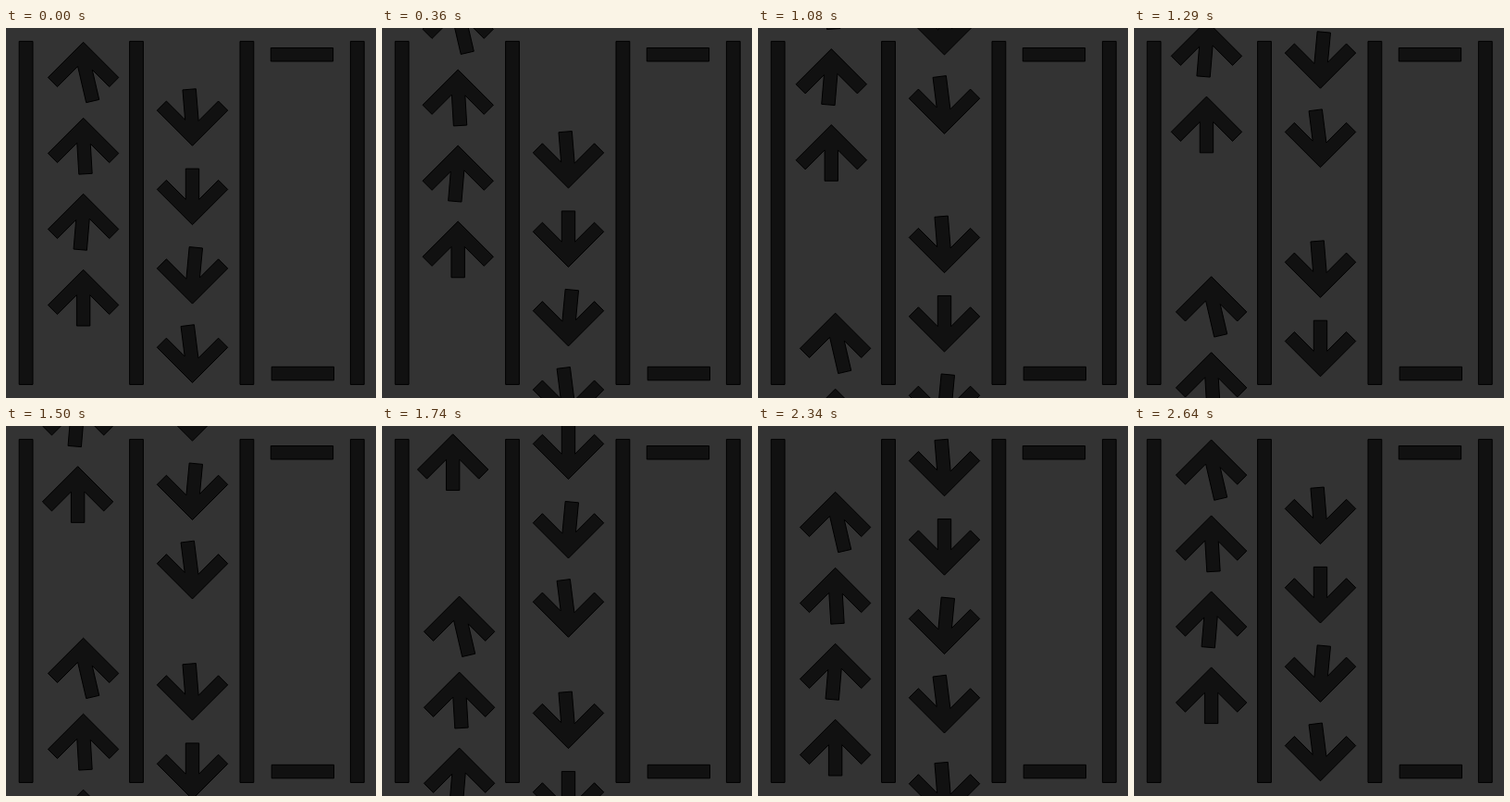
Write an HTML page with a canvas that moves like this. It is 400 by 400 pixels and loops after 2.67 s.

```html
<!DOCTYPE html>
<html lang="en">
<head>
<meta charset="utf-8">
<title>Arrow lanes</title>
<style>
  html, body { margin: 0; width: 100%; height: 100%; overflow: hidden; background: #333; }
  canvas { display: block; width: 400px; height: 400px; }
</style>
</head>
<body>
<canvas id="stage" width="400" height="400"></canvas>
<script>
const ctx = document.getElementById('stage').getContext('2d');
const LOOP = 2670, STEP = 30, END = LOOP - STEP;
const WING = 38.2, WING_END = 10.1, NOTCH = 2 * WING_END, HALF_SHAFT = 7.2;

// Shaft tilt in degrees and shaft length, top to bottom in each lane
const upArrows = [[13.1, 44.7], [3.4, 40.3], [-4.8, 40.3], [0, 40.5]];
const downArrows = [[4.7, 40.9], [0, 40.4], [-5.4, 40.8], [7.2, 42]];

function paint() {
  ctx.fillStyle = '#111';
  ctx.strokeStyle = '#000';
  ctx.lineWidth = 1;
  ctx.fill();
  ctx.stroke();
}

function bar(x, y, w, h) {
  ctx.beginPath();
  ctx.rect(x, y, w, h);
  paint();
}

function arrow(x, y, flip, [tilt, length]) {
  const a = tilt * Math.PI / 180, sin = Math.sin(a), cos = Math.cos(a);
  const shaftPoint = (side, along) => [
    side * HALF_SHAFT * cos + along * sin,
    NOTCH - side * HALF_SHAFT * sin + along * cos
  ];
  const joint = side => HALF_SHAFT * Math.tan(Math.PI / 4 + side * a);
  const inner = WING - WING_END, low = WING + WING_END;
  const points = [
    [0, 0], [WING, WING], [inner, low],
    shaftPoint(1, joint(1)), shaftPoint(1, length),
    shaftPoint(-1, length), shaftPoint(-1, joint(-1)),
    [-inner, low], [-WING, WING]
  ];
  ctx.beginPath();
  for (const [px, py] of points) ctx.lineTo(x + flip * px, y + flip * py);
  ctx.closePath();
  paint();
}

function upGroup(x, y) {
  upArrows.forEach((shape, i) => arrow(x, y + 82 * i, 1, shape));
}

function downGroup(y) {
  downArrows.forEach((shape, i) => arrow(201.5, y + 85.4 * i, -1, shape));
}

function draw(t) {
  const left = END - t;
  ctx.fillStyle = '#333';
  ctx.fillRect(0, 0, 400, 400);

  for (let i = 0; i < 4; i++) bar(14.2 + 119.4 * i, 14.4, 14.8, 371);
  bar(286.3, 21.5, 67.3, 14.5);
  bar(287.2, 366.3, 67.3, 14.5);

  // Leaving groups are slower than the arriving ones
  upGroup(83.6 - 0.004 * t, 15.3 - 0.1451 * t);
  upGroup(83.6, 14.9 + 0.188 * left);
  downGroup(127.3 + 0.1272 * t);
  downGroup(127.6 - 0.1727 * left);
}

const start = performance.now();
function tick(now) {
  const t = Math.max(0, now - start) % LOOP;
  draw(Math.floor(t / STEP) * STEP);
  requestAnimationFrame(tick);
}
tick(start);
</script>
</body>
</html>
```
